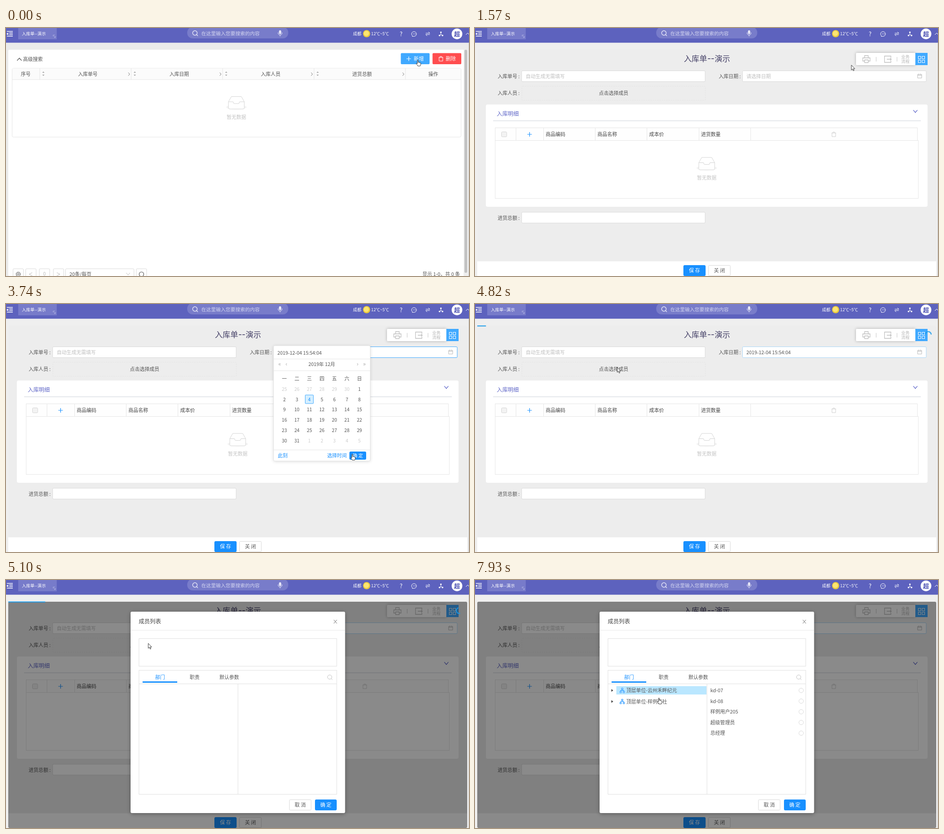
Recreate the animation shown at these times as an HTML page. Size 1022x548 px, loop 8 s.

```html
<!DOCTYPE html>
<html lang="zh-CN">
<head>
<meta charset="utf-8">
<title>入库单</title>
<style>
html, body { margin: 0; width: 100%; height: 100%; overflow: hidden; background: #ebebeb; }
svg { display: block; width: 1022px; height: 548px; }
text { font-family: "Noto Sans CJK SC", "Noto Sans CJK", "Noto Sans", sans-serif; white-space: pre; }
.a { animation: 8s step-end infinite; }
.l { animation: 8s linear infinite; }

/* one percent is 80 ms */
@keyframes list { 0% { visibility: visible } 4.6%, 100% { visibility: hidden } }
@keyframes form { 0% { visibility: hidden } 4.6%, 100% { visibility: visible } }
@keyframes veil { 0%, 12.8% { opacity: .68 } 14.7%, 100% { opacity: 0 } }
@keyframes load { 0% { visibility: hidden } 4.6% { visibility: visible } 13%, 100% { visibility: hidden } }
@keyframes closeOnly { 0% { visibility: hidden } 4.6% { visibility: visible } 16.2%, 100% { visibility: hidden } }
@keyframes saveClose { 0% { visibility: hidden } 16.2%, 100% { visibility: visible } }
@keyframes focus { 0% { stroke: #d9d9d9 } 29.7% { stroke: #40a9ff } 54.5%, 100% { stroke: #a9d6f8 } }
@keyframes unpicked { 0% { visibility: hidden } 4.6% { visibility: visible } 40.2%, 100% { visibility: hidden } }
@keyframes picked { 0% { visibility: hidden } 40.2%, 100% { visibility: visible } }
@keyframes calendar {
  0%, 29.7% { opacity: 0; transform: scaleY(.8) }
  31.25% { opacity: .385; transform: scaleY(.877) }
  34%, 48.5% { opacity: 1; transform: none }
  50.5%, 100% { opacity: 0; transform: scaleY(.8) }
}
@keyframes modal { 0%, 61.5% { opacity: 0 } 63.2%, 100% { opacity: 1 } }
@keyframes tree { 0% { visibility: hidden } 70.5%, 100% { visibility: visible } }
@keyframes chosen { 0% { visibility: hidden } 76.5%, 100% { visibility: visible } }
@keyframes people { 0% { visibility: hidden } 79%, 100% { visibility: visible } }
@keyframes bar {
  0%, 6.2% { width: 0 } 8% { width: 80px } 11.375% { width: 205px }
  13.5% { width: 900px } 14.6% { width: 1013px } 14.61%, 59% { width: 0 }
  60.25% { width: 19px } 63.75% { width: 81px } 68.6% { width: 320px }
  75% { width: 600px } 80.75% { width: 947px } 82% { width: 1000px } 82.01%, 100% { width: 0 }
}
@keyframes ringA { 0% { visibility: hidden } 6.2% { visibility: visible } 14.6%, 100% { visibility: hidden } }
@keyframes ringB { 0% { visibility: hidden } 59% { visibility: visible } 70.5%, 100% { visibility: hidden } }
@keyframes ringC { 0% { visibility: hidden } 70.5% { visibility: visible } 82.6%, 100% { visibility: hidden } }
@keyframes turn { to { transform: rotate(360deg) } }
@keyframes dots { from { transform: rotate(6deg) } to { transform: rotate(2406deg) } }
@keyframes pointer {
  0%, 16.2% { transform: translate(909px, 70px) }
  27.8%, 32% { transform: translate(645px, 110px) }
  38.5%, 43.3% { transform: translate(610px, 331px) }
  47%, 49% { transform: translate(775px, 331px) }
  55.4%, 70.5% { transform: translate(314px, 140px) }
  76% { transform: translate(440px, 243px) }
  80.5%, 87.2% { transform: translate(491px, 256px) }
  91% { transform: translate(719px, 274px) }
  93% { transform: translate(700px, 272px) }
  99%, 100% { transform: translate(406px, 260px) }
}
@keyframes hand {
  0% { visibility: visible } 3% { visibility: hidden } 38% { visibility: visible }
  49.5% { visibility: hidden } 73.5% { visibility: visible } 79.5% { visibility: hidden }
  96.5%, 100% { visibility: visible }
}
@keyframes arrow {
  0% { visibility: hidden } 3% { visibility: visible } 27% { visibility: hidden }
  33% { visibility: visible } 38% { visibility: hidden } 49.5% { visibility: visible }
  73.5% { visibility: hidden } 79.5% { visibility: visible } 96.5%, 100% { visibility: hidden }
}
@keyframes beam { 0% { visibility: hidden } 27% { visibility: visible } 33%, 100% { visibility: hidden } }
</style>
</head>
<body>
<script>
const BLUE = '#1890ff', SKY = '#40a9ff', EDGE = '#e6e6e6', GREY = '#bfbfbf', INK = '#555';

const attrs = o => Object.entries(o).map(([k, v]) => ` ${k}="${v}"`).join('');
const text = (x, cy, s, size = 10.8, fill = INK, o = {}) =>
  `<text x="${x}" y="${(cy + size * .37).toFixed(2)}" font-size="${size}" fill="${fill}"${attrs(o)}>${s}</text>`;
const mid = (x, cy, s, size, fill, o = {}) => text(x, cy, s, size, fill, { 'text-anchor': 'middle', ...o });
const box = (x, y, w, h, fill, stroke = 'none', r = 0, o = {}) =>
  `<rect x="${x}" y="${y}" width="${w}" height="${h}" rx="${r}" fill="${fill}" stroke="${stroke}"${attrs(o)}/>`;
const line = (d, stroke = EDGE, w = 1, o = {}) =>
  `<path d="${d}" fill="none" stroke="${stroke}" stroke-width="${w}"${attrs(o)}/>`;
const disc = (x, y, r, fill, stroke = 'none') => `<circle cx="${x}" cy="${y}" r="${r}" fill="${fill}" stroke="${stroke}"/>`;
const at = (x, y, s) => `<g transform="translate(${x} ${y})">${s}</g>`;
const step = (name, s) => `<g class="a" style="animation-name:${name}">${s}</g>`;
const ease = (name, s, css = '') => `<g class="l" style="animation-name:${name};${css}">${s}</g>`;
const each = (list, f) => list.map(f).join('');

const plus = (x, y, c) => line(`M${x - 5} ${y}h10M${x} ${y - 5}v10`, c, 1.2);
const trash = (x, y, c) => line(`M${x - 5} ${y - 3}h10M${x - 2} ${y - 3}v-2h4v2M${x - 4} ${y - 3}v8h8v-8`, c);
const lens = (x, y, r, c, w) => at(x, y, `<circle r="${r}" fill="none" stroke="${c}" stroke-width="${w}"/>` +
  line(`M${r * .7} ${r * .7}l${r * .6} ${r * .6}`, c, w));
const caret = (x, y, w, h, c, sw = 1) => line(`M${x - w} ${y - h}L${x} ${y + h}L${x + w} ${y - h}`, c, sw);
const button = (x, y, w, s, main) => box(x + .5, y + .5, w - 1, 23, main ? BLUE : '#fff', main ? BLUE : '#d9d9d9', 2) +
  mid(x + w / 2, y + 12, s, 11, main ? '#fff' : INK, main ? { 'font-weight': 500 } : {});
const input = (x, y, w, o) => box(x, y, w, 24, '#fff', '#d9d9d9', 2, o);
const empty = (x, y, c = '#d4d4d4') => at(x, y,
  `<ellipse cy="10" rx="22.5" ry="5" fill="#f3f3f3"/>` +
  `<path d="M-17.5-2L-11-13.5H11L17.5-2V11q0 3-3 3h-29q-3 0-3-3Z" fill="#fff" stroke="${c}"/>` +
  line('M-17.5-2h10q1 0 1 2t2 2h9q2 0 2-2t1-2h10', c)) + mid(x, y + 31.5, '暂无数据', 10.8, '#c4c4c4');

const header = box(0, 0, 1022, 32.5, '#5d62be') +
  line('M2 7.5h13M7 11h8M7 14.5h8M2 18h13', '#fff', 1.3) + '<path d="M5 10v6l-4-3z" fill="#fff"/>' +
  box(27, 0, 85, 25, '#777bca') + text(35, 13, '入库单--演示', 9.3, '#fff', { 'font-weight': 500 }) +
  line('M104 15.5h4M104 15.5v3M105 17l4 4M109 18v3h-3', '#b9bbe6', .8) +
  box(400, -2, 223, 25, '#787cca', 'none', 12) + lens(417, 11, 5, '#e8e8f8', 1.4) +
  text(431, 12, '在这里输入您要搜索的内容', 10.75, '#d3d5f0') +
  box(602.5, 5, 5, 8.5, '#e8e8f8', 'none', 2.5) + line('M600.5 10q0 5.5 4.5 5.5t4.5-5.5M605 15.5v3', '#e8e8f8') +
  text(766, 13, '成都', 9.2, '#fff') + disc(796, 12.5, 8, '#e8c93e') + disc(795.5, 12, 5.8, '#fce573') +
  text(806, 13, '12℃~5℃', 9.3, '#fff') + mid(872, 13, '?', 13, '#fff') +
  line('M897.5 17.5a5.5 5.2 0 1 1 3 .9h-4z', '#fff') + each([899, 901.5, 904], x => disc(x, 13, .8, '#fff')) +
  line('M926.5 11.5h9l-3-3M935.5 14.5h-9l3 3', '#fff') +
  line('M960 10v4l-3 2.5M960 14l3 2.5', '#fff') + disc(960, 9.5, 1.7, '#fff') + disc(957, 16.5, 1.8, '#fff') + disc(963.5, 16.5, 1.8, '#fff') +
  disc(995.5, 13, 11.8, '#fff') + mid(995.5, 13, '超', 13, '#4d52b4', { 'font-weight': 700 }) +
  line('M1015 15l4-4 4 4', '#fff') + line('M1021.5 33v515', '#c4c4c4');

const columns = ['入库单号', '入库日期', '入库人员', '进货总额'];
const listPage = box(5, 48, 1013, 500, '#fff', 'none', 3) + box(1010, 48, 12, 500, '#efefef') +
  box(1012, 48, 6, 493, '#c2c2c2', 'none', 3) +
  line('M24.5 72l5-5.5 5 5.5', INK, 1.2) + text(37.5, 69, '高级搜索', 10.9, INK) +
  box(871.5, 55.5, 63.5, 24.5, SKY, 'none', 2) + plus(889, 68, '#fff') + text(900, 68, '新增', 11.2, '#fff', { 'font-weight': 500 }) +
  box(941.5, 55.5, 63.5, 24.5, '#ff4d4f', 'none', 2) + trash(960, 68, '#fff') + text(970.5, 68, '删除', 11.2, '#fff', { 'font-weight': 500 }) +
  box(13.5, 89, 991, 152, '#fff', EDGE, 3) + box(14, 89.5, 990, 24.5, '#fbfbfb') +
  line('M13 114h992M74.5 89v25') + mid(43.5, 102, '序号') + mid(943, 102, '操作') +
  each(columns, (s, i) => at(74.5 + 201.8 * i, 0,
    line('M201.8 89v25') + mid(106, 102, s) + line('M195.5 98.5l3 3.5-3 3.5', '#777') +
    '<path d="M5.5 99l2.5-3 2.5 3zM5.5 103l2.5 3 2.5-3z" fill="#aaa"/>')) + empty(508.5, 165) +
  each([[15, 24], [43, 24], [73, 24], [104, 24], [131, 152], [287, 24]], ([x, w]) => box(x + .5, 532, w - 1, 24, '#fff', '#d9d9d9', 2)) +
  `<circle cx="27" cy="544" r="4.5" fill="none" stroke="${INK}" stroke-width="1.5" stroke-dasharray="2.5 1"/>` + disc(27, 544, 1.8, '#fff', INK) +
  line('M58 540.5l-7 3.5 7 3.5', '#bbb') + mid(85, 543, '0', 10.5, '#bbb') + line('M112 540.5l7 3.5-7 3.5', '#bbb') +
  text(140, 544, '20条/每页', 10.8) + caret(269.5, 543.5, 4, 2.5, GREY) +
  line('M296 548a5 5 0 1 1 6 0', INK, 1.2) + text(919, 544, '显示 1-0，共 0 条', 10.8);

const toolbar = step('load', box(837, 50.5, 166, 36.5, '#c2c2c2', 'none', 7)) +
  box(841, 55, 131, 27, '#fff', 'none', 2, { filter: 'drop-shadow(0 0 3px #0004)' }) +
  line('M860 66v-5h8v5M860 73h-4v-7h16v7h-4M860 70.5h8v6h-8z', GREY, 1.3) +
  line('M885.5 64v10M931.5 64v10', '#c8c8c8') +
  line('M918 66v-4h-14v14h14v-4M909 69h10M916.5 66.5l2.5 2.5-2.5 2.5', GREY, 1.3) +
  mid(950, 63.5, '业务', 9.2, '#b5b5b5') + mid(950, 74, '流程', 9.2, '#b5b5b5') +
  box(972, 55, 27, 27, SKY) + each([978.5, 987], x => each([62.5, 71], y => box(x, y, 5.5, 5.5, 'none', '#fff')));

const label = (y, s) => text(50, y, s + ' :', 10.8);
const stamp = '2019-12-04 15:54:04';
const formFields =
  `<text y="74.3" font-size="17.1" font-weight="500" fill="#464268"><tspan x="461">入库单</tspan><tspan x="513" font-size="22">--</tspan><tspan x="529">演示</tspan></text>` +
  toolbar + label(107, '入库单号') + input(103, 94.5, 405) + text(112, 107, '自动生成无需填写', 10.8, GREY) +
  text(538, 107, '入库日期 :', 10.8) + input(590.5, 94.5, 405.5, { class: 'a', style: 'animation-name:focus' }) +
  step('unpicked', text(599, 107, '请选择日期', 10.8, GREY)) + step('picked', text(599, 107, stamp, 10.6)) +
  line('M977 102.5h9v8h-9zM977 105h9M979.5 101v2.5M983.5 101v2.5', '#b8b8b8') +
  label(144, '入库人员') + box(103.5, 128.5, 405, 31, 'none', '#e4e4e4', 2, { 'stroke-dasharray': '3 2' }) + mid(306, 144, '点击选择成员', 10.8) +
  box(24, 169, 975, 226, '#fff', 'none', 4) + text(48, 189, '入库明细', 12.2, '#6168c8') +
  caret(972, 184, 4.5, 2.7, '#5a62c8', 1.2) + line('M40 205h944', '#dcdfe6', 1.6) +
  box(44.5, 220.5, 932, 28, '#fefefe', EDGE) + box(44.5, 248.5, 934, 128, '#fff', EDGE) +
  line('M90.5 220v28M151.5 220v28M265.5 220v28M379.5 220v28M494.5 220v28M608.5 220v28') +
  box(58.5, 229.5, 11.5, 11, '#f3f3f3', '#d5d5d5', 2) + plus(120.5, 235, BLUE) +
  each(['商品编码', '商品名称', '成本价', '进货数量'], (s, i) => text(156 + 114.3 * i, 235, s, 10.8, '#444')) +
  trash(792, 235, '#cfcfcf') + empty(511.5, 299.5) + label(420, '进货总额') + input(103, 407, 405);

// While loading, the veil fades the form and the darken layer flattens its white areas.
const formPage = box(0, 32.5, 1022, 515.5, '#efefef') + box(5, 48, 1013, 500, '#ededed', 'none', 3) + formFields +
  ease('veil', box(5, 48, 1013, 405, '#f4f4f4')) +
  step('load', box(5, 48, 1013, 405, '#f2f2f2', 'none', 0, { style: 'mix-blend-mode:darken' })) +
  box(5, 515.5, 1013, 33, '#fff') +
  step('closeOnly', button(487, 524, 49, '关 闭')) +
  step('saveClose', button(460, 524, 49, '保 存', true) + button(515, 524, 49, '关 闭'));

const loading = at(512, 193, ease('dots', each([[0, -6, .8], [6, 0, .6], [0, 6, .35], [-6, 0, 1]],
  ([x, y, o]) => `<circle cx="${x}" cy="${y}" r="2.7" fill="${BLUE}" opacity="${o}"/>`))) + mid(511.5, 213, '加载中...', 10.8, BLUE);

const dayX = i => 614.5 + 27.6 * i;
const day = (_, n) => {
  const d = n - 5, inMonth = d > 0 && d < 32;
  const shown = d < 1 ? d + 30 : inMonth ? d : d - 31;
  return mid(dayX(n % 7), 187.8 + 22.9 * Math.floor(n / 7), shown, 10.3, d === 4 ? BLUE : inMonth ? INK : '#ccc');
};
const calendar = box(590.5, 92, 213.5, 255, '#fff', '#e2e2e2', 3, { filter: 'drop-shadow(0 1px 3px #0002)' }) +
  step('unpicked', text(599, 108, '请选择日期', 10.8, GREY) + line('M599.5 98v16', INK)) + step('picked', text(599, 108, stamp, 10.6)) +
  line('M591 121.5h213M591 147.5h213M591 322.5h213') +
  mid(697, 133, '2019年 12月', 10.6, INK, { 'font-weight': 500 }) +
  each(['«', '‹', '›', '»'], (s, i) => mid([604, 619, 776, 791][i], 132, s, 13, '#aaa')) +
  each([...'一二三四五六日'], (s, i) => mid(dayX(i), 165, s, 10.8)) +
  box(660.5, 201, 18, 19, '#d5efff', SKY, 1) + each(Array(42).fill(0), day) +
  text(600, 335, '此刻', 10.8, BLUE) + text(709, 335, '选择时间', 10.8, BLUE) +
  box(758.5, 326.5, 36, 17, '#f5f5f5', '#ddd', 2) + mid(776.5, 335, '确 定', 10.4, GREY) +
  step('picked', box(758.5, 326.5, 36, 17, BLUE, BLUE, 2) + mid(776.5, 335, '确 定', 10.4, '#fff'));

const org = y => line(`M325 ${y - 2}v2M321.5 ${y + 2}v-2h7v2`, BLUE) +
  each([[323.5, -5], [320, 2], [327, 2]], ([x, dy]) => box(x, y + dy, 3, 3, '#fff', BLUE));
const branch = (y, s) => `<path d="M301 ${y - 3}l4 3-4 3z" fill="#444"/>` + org(y) + text(334, y, s, 10.8);
const members = ['kd-07', 'kd-08', '样例用户205', '超级管理员', '总经理'];
const modal = box(5, 48, 1013, 500, '#000', 'none', 3, { opacity: .46 }) +
  box(275, 70, 473.5, 445, '#fff', 'none', 3, { filter: 'drop-shadow(0 2px 5px #0005)' }) +
  text(293, 91, '成员列表', 12.3, '#444') + line('M723.5 88l7 8M730.5 88l-7 8', '#888', 1.1) + line('M275 111h473') +
  box(293.5, 129.5, 436.5, 61, '#fff', '#e0e0e0') + box(293.5, 199.5, 436.5, 274, '#fff', '#e0e0e0') +
  line('M293 229.5h437M512 229v245', '#e0e0e0') +
  each(['部门', '职责', '默认参数'], (s, i) => mid(340 + 76.4 * i, 214.5, s, 10.8, i ? INK : BLUE)) +
  box(301.5, 224, 76.5, 3, BLUE) + lens(714.5, 214.5, 4.7, GREY, 1) +
  step('chosen', box(312, 234.5, 199, 18.5, '#bae7ff')) +
  step('tree', branch(244, '顶层单位-云州禾畔纪元') + branch(268.5, '顶层单位-样例商社')) +
  step('people', each(members, (s, i) => text(519.5, 244 + 23.6 * i, s, 10.8) + disc(720, 244 + 23.6 * i, 5, '#fff', '#d9d9d9'))) +
  button(625, 485, 49, '取 消') + button(682, 485, 48, '确 定', true);

const ring = (name, base) => step(name, at(1000.5, 67.5, `<g transform="rotate(${base})">` +
  ease('turn', line('M4.6-4.6A6.5 6.5 0 0 0-4.6 4.6', '#1a9bea', 2), 'animation-duration:.4s') + '</g>'));
const progress = box(5, 47.5, 0, 2, '#1a9bea', 'none', 0, { class: 'l', style: 'animation-name:bar' }) +
  ring('ringA', 117) + ring('ringB', 27) + ring('ringC', 243);

const pointer = ease('pointer',
  step('arrow', '<path d="M0 0v11l2.5-2.3 1.8 4 1.7-.8-1.8-3.8h3.4z" fill="#fff" stroke="#222" stroke-width=".9"/>') +
  step('hand', '<path d="M-1 8V2q0-1.3 1-1.3t1 1.3v4q2-.8 2.2.7 1.6-.7 2 .6 1.5-.3 1.5 1.2 0 3-1.5 5.500H0Q-1 11.5-3.5 9-3 7-1 9z" fill="#fff" stroke="#222" stroke-width=".9"/>') +
  step('beam', line('M-2.5-5.5q2 0 2.5 1 .5-1 2.5-1M0-5v10M-2.5 5.5q2 0 2.5-1 .5 1 2.5 1', '#222')));

document.body.innerHTML = `<svg viewBox="0 0 1022 548">${box(0, 0, 1022, 548, '#ebebeb')}` +
  step('list', listPage) + step('form', formPage) + step('load', loading) +
  ease('calendar', calendar, 'transform-origin:590px 92px') + ease('modal', modal) +
  header + progress + pointer + '</svg>';
</script>
</body>
</html>
```
